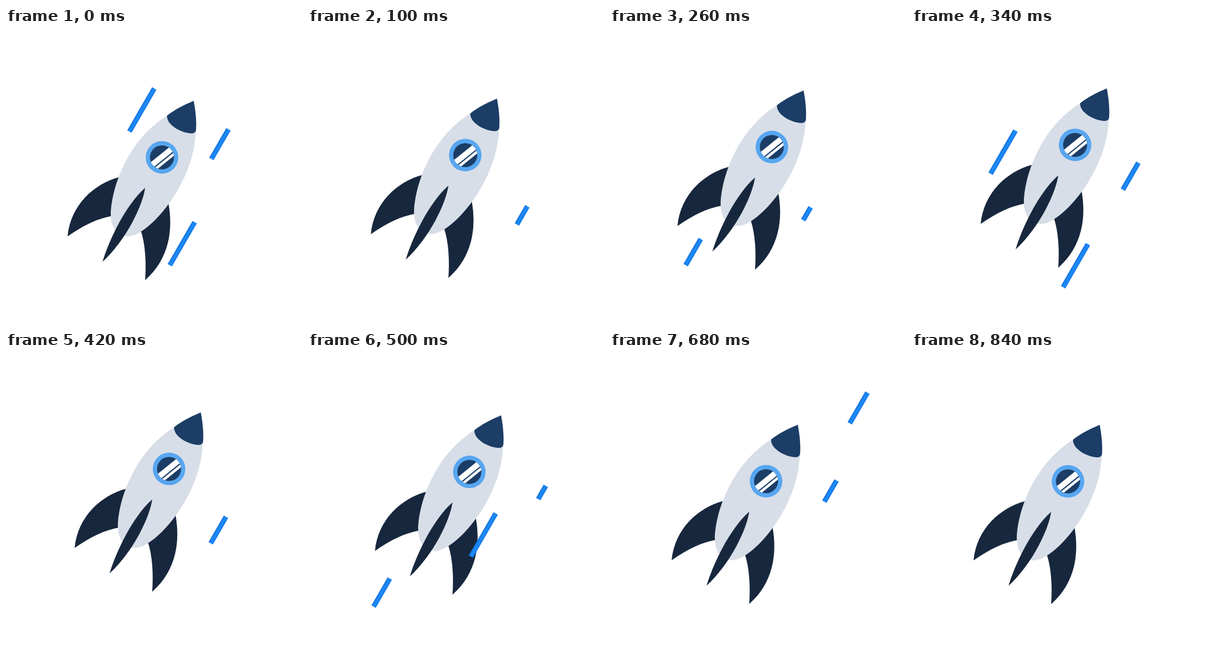
These frames come from a looping animation (500 px wide and 500 px high, 960 ms). An HTML page with a canvas:

```html
<!DOCTYPE html>
<html>
<head>
<meta charset="utf-8">
<style>
  html, body { margin: 0; height: 100%; overflow: hidden; background: #fff; }
  canvas { display: block; }
</style>
</head>
<body>
<canvas id="stage" width="500" height="500"></canvas>
<script>
const ctx = document.getElementById('stage').getContext('2d');
const LOOP = 960, STEP = 20, LAST = 840;

// Every streak draws itself on, flies RUN pixels up its lane and wipes off.
const SPEED = 1.48, LENGTH = 84, RUN = 112, WIDTH = 8.4, ANGLE = -Math.PI / 3;

// Lane distance from the corner: [start along the lane, launch time] per streak.
const lanes = {
  222.5: [[-211, 543]],
  238: [[-150, 281]],
  268: [[-55, -62], [-8, 121]],
  311: [[-344, 162], [-317, 463]],
  411: [[-18, -39], [-165, 441], [-22, 542], [46, 588]],
  440: [[-215, -61], [-255, 281], [-38, 652]],
  445: [[-118, 243]],
  461: [[-107, 385], [-216, 503]],
  471.5: [[-111, 76]]
};

const rocket = [
  ['#17273d', 'M191 252C149 263 109 299 104 352C130 334 155 321 182 317Z'],
  ['#17273d', 'M274 294C283 340 276 390 235 426C237 400 236 365 227 340Z'],
  ['#d8dee8', 'M317 123C322 145 322 165 320 182C314 268 241 350 207 352C186 352 177 335 177 315C178 270 205 190 272 148Z'],
  ['#1b3d66', 'M317 123C320 139 322 156 321 172Q320 178 313 178C294 177 271 163 272 148C286 137 301 130 317 123Z'],
  ['#17273d', 'M235 270C231 299 204 357 163 395C173 361 201 300 235 270Z']
].map(([color, d]) => [color, new Path2D(d)]);

const ease = p => (1 - Math.cos(Math.PI * Math.min(1, Math.max(0, p)))) / 2;
const lift = t => ease(t / 360) - ease((t - 400) / 300);

const shade = ctx.createLinearGradient(0, -WIDTH / 2, 0, WIDTH / 2);
['#1470dc', '#1e8dfa', '#1578e6'].forEach((color, i) => shade.addColorStop(i / 2, color));

function disc(radius, color) {
  ctx.beginPath();
  ctx.arc(0, 0, radius, 0, 2 * Math.PI);
  ctx.fillStyle = color;
  ctx.fill();
}

function drawRocket(t) {
  const k = lift(t);
  ctx.save();
  ctx.translate(12.1 * k, -21.2 * k);
  for (const [color, path] of rocket) {
    ctx.fillStyle = color;
    ctx.fill(path);
  }
  ctx.translate(263.5, 218.5);
  disc(27.5, '#57a6f0');
  disc(20.3, '#1b3d66');
  ctx.clip();
  ctx.rotate(-0.68);
  ctx.fillStyle = '#fff';
  ctx.fillRect(-30, -5.5, 60, 9.5);
  ctx.fillRect(-30, 6, 60, 4.5);
  ctx.restore();
}

function drawStreaks(t) {
  ctx.save();
  ctx.rotate(ANGLE);
  ctx.fillStyle = shade;
  for (const [offset, streaks] of Object.entries(lanes)) {
    ctx.save();
    ctx.translate(0, +offset);
    for (const [start, launch] of streaks) {
      const flown = SPEED * (t - launch);
      const head = Math.min(flown, RUN);
      const tail = Math.max(flown - LENGTH, 0);
      if (head > tail) ctx.fillRect(start + tail, -WIDTH / 2, head - tail, WIDTH);
    }
    ctx.restore();
  }
  ctx.restore();
}

function draw(now) {
  const t = Math.min(LAST, Math.floor(now % LOOP / STEP) * STEP);
  ctx.fillStyle = '#fff';
  ctx.fillRect(0, 0, 500, 500);
  drawRocket(t);
  drawStreaks(t);
}

let start;
function tick(now) {
  start ??= now;
  draw(now - start);
  requestAnimationFrame(tick);
}
draw(0);
requestAnimationFrame(tick);
</script>
</body>
</html>
```
